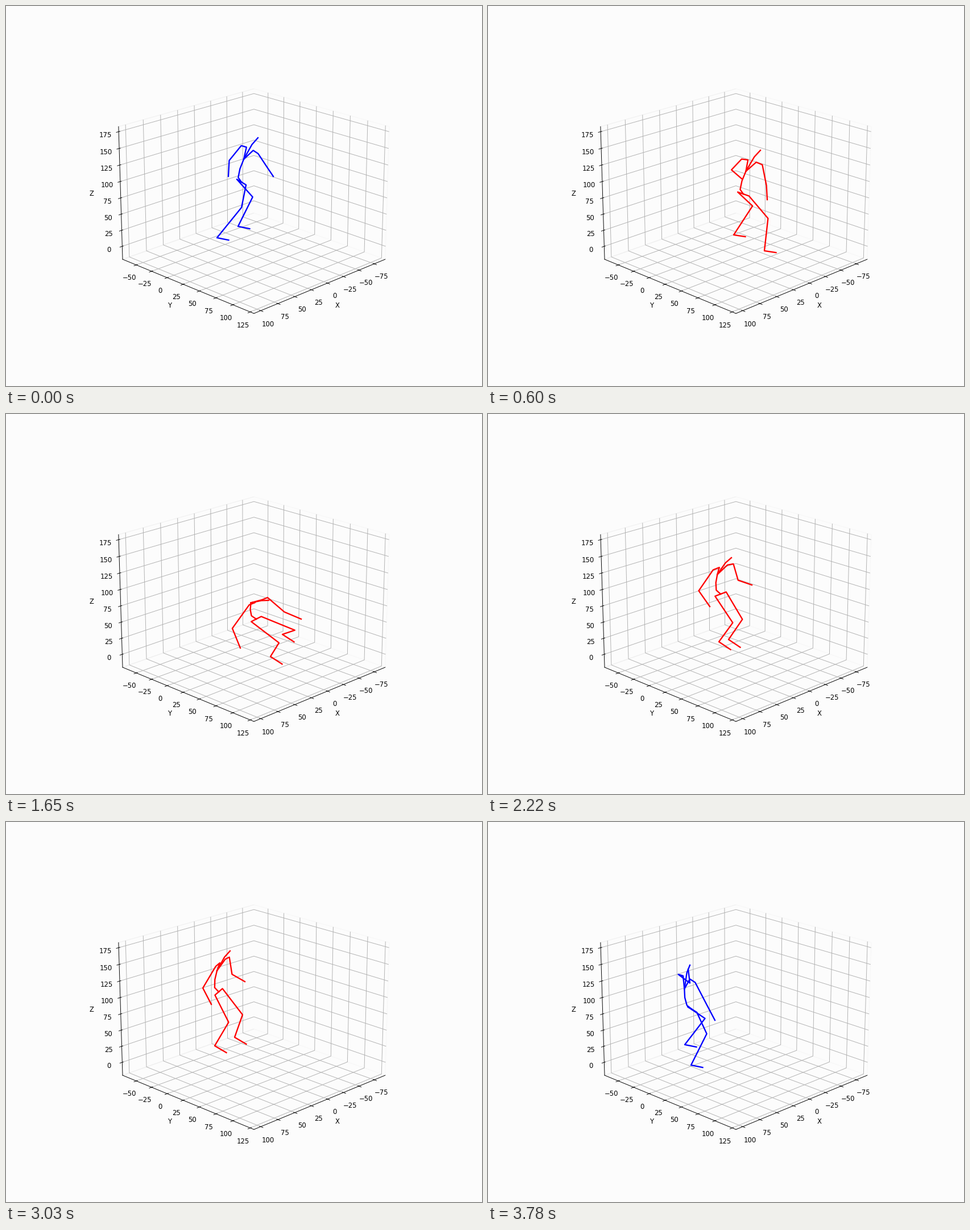
Write a matplotlib script that moves like this. It is 837 px wide and 669 px high and loops after 3.81 s.

```python
import numpy as np
import matplotlib.pyplot as plt
from matplotlib.animation import FuncAnimation
from matplotlib.lines import Line2D
from matplotlib.transforms import IdentityTransform

W, H, DPI = 837, 669, 83.7
FRAMES, STEP = 127, 30
BG = "#fcfcfc"
TIMES = np.array([0, 600, 1050, 1650, 2220, 3030, 3780], float)


def path(*keys):
    """Smooth cubic path through one key value per moment in TIMES."""
    keys = np.array(keys, float)
    slopes = np.gradient(keys, TIMES, axis=0, edge_order=2)

    def at(t):
        k = min(np.searchsorted(TIMES, t, side="right") - 1, len(TIMES) - 2)
        h = TIMES[k + 1] - TIMES[k]
        s = (t - TIMES[k]) / h
        return ((1 + 2 * s) * (1 - s) ** 2 * keys[k]
                + s * (1 - s) ** 2 * h * slopes[k]
                + s * s * (3 - 2 * s) * keys[k + 1]
                + s * s * (s - 1) * h * slopes[k + 1])
    return at


# The pose is led by head, pelvis, hands, ankles and the turn of the body.
turn = path(45, 30, 78, 140, 148, 125, 45)
pelvis = path((414, 310), (449, 331), (458, 374), (440, 361),
              (409, 317), (374, 299), (359, 330))
head = path((443, 232), (479, 254), (482, 309), (462, 328),
            (428, 253), (394, 227), (355, 252))
left_hand = path((391, 300), (446, 304), (541, 334), (519, 361),
                 (464, 301), (420, 281), (352, 259))
right_hand = path((470, 300), (491, 341), (491, 401), (412, 412),
                  (390, 339), (361, 321), (399, 349))
left_ankle = path((408, 388), (432, 403), (471, 385), (486, 388),
                  (423, 397), (402, 379), (346, 392))
right_ankle = path((371, 408), (486, 431), (513, 410), (465, 427),
                   (406, 401), (367, 394), (357, 428))


def length(a, b):
    return max(np.hypot(*(b - a)), 1.0)


def bent(a, b, part, bend):
    """Point between a and b, pushed sideways by bend pixels."""
    dx, dy = b - a
    return a + part * (b - a) + bend * np.array([-dy, dx]) / length(a, b)


def skeleton(t):
    angle = np.radians(turn(t))
    cos, sin = np.cos(angle), np.sin(angle)
    root, top = pelvis(t), head(t)

    # The back rounds more as the head comes closer to the pelvis.
    chest = bent(top, root, 0.53, 36 - 0.31 * length(top, root))
    low = root + 0.2 * (chest - root) - (6.5, 0)
    mid = root + 0.58 * (chest - root) - (5, 0)
    neck = chest + 0.66 * (top - chest) - (2, 1)
    chains = [[root, low, mid, chest, neck, top]]

    centre = chest + 0.42 * (top - chest) - (0, 1)
    across = np.array([21 * cos, 10 * sin])
    arms = ((-1, left_hand(t), 0.55), (1, right_hand(t), 0.6))
    for side, hand, part in arms:
        shoulder = centre + side * across
        collar = 0.4 * shoulder + 0.45 * neck + 0.15 * chest
        if side < 0:
            bend = max(30 - 0.35 * length(shoulder, hand), 0)
        else:
            bend = 10 - 14 * cos
        elbow = bent(shoulder, hand, part, bend)
        chains.append([chest, collar, shoulder, elbow, hand])

    across = np.array([11.5 * cos, 7 * sin])
    for side, ankle in ((-1, left_ankle(t)), (1, right_ankle(t))):
        hip = root + side * across
        forward = 60 - 0.4 * length(hip, ankle)
        knee = (hip + ankle) / 2 + forward * np.array([1, -0.1 - 0.4 * cos])
        toe = ankle + (20.5, 8.5 - 6.2 * cos)
        chains.append([root, hip, knee, ankle, toe])
    return [np.array(chain) for chain in chains]


fig = plt.figure(figsize=((W + 1e-3) / DPI, (H + 1e-3) / DPI), dpi=DPI, facecolor=BG)
ax = fig.add_subplot(projection="3d", facecolor=BG)
ax.view_init(elev=20, azim=45)
ax.set_xlim3d(-93.3, 109.7, view_margin=0)
ax.set_ylim3d(-72.7, 130.3, view_margin=0)
ax.set_zlim3d(-20.4, 182.6, view_margin=0)
ax.set_xticks(range(-75, 101, 25))
ax.set_yticks(range(-50, 126, 25))
ax.set_zticks(range(0, 176, 25))
ax.set(xlabel="X", ylabel="Y", zlabel="Z")
for axis in (ax.xaxis, ax.yaxis, ax.zaxis):
    axis.pane.set_fill(False)

bones = [Line2D([], [], lw=2, transform=IdentityTransform()) for _ in range(5)]
for bone in bones:
    fig.add_artist(bone)


def draw(i):
    color = "blue" if i < 10 or i == FRAMES - 1 else "red"
    for bone, chain in zip(bones, skeleton(i * STEP)):
        bone.set_data(chain[:, 0], H - chain[:, 1])
        bone.set_color(color)
    return bones


anim = FuncAnimation(fig, draw, frames=FRAMES, interval=STEP,
                     repeat=True, repeat_delay=0, blit=False)
plt.show()
```
